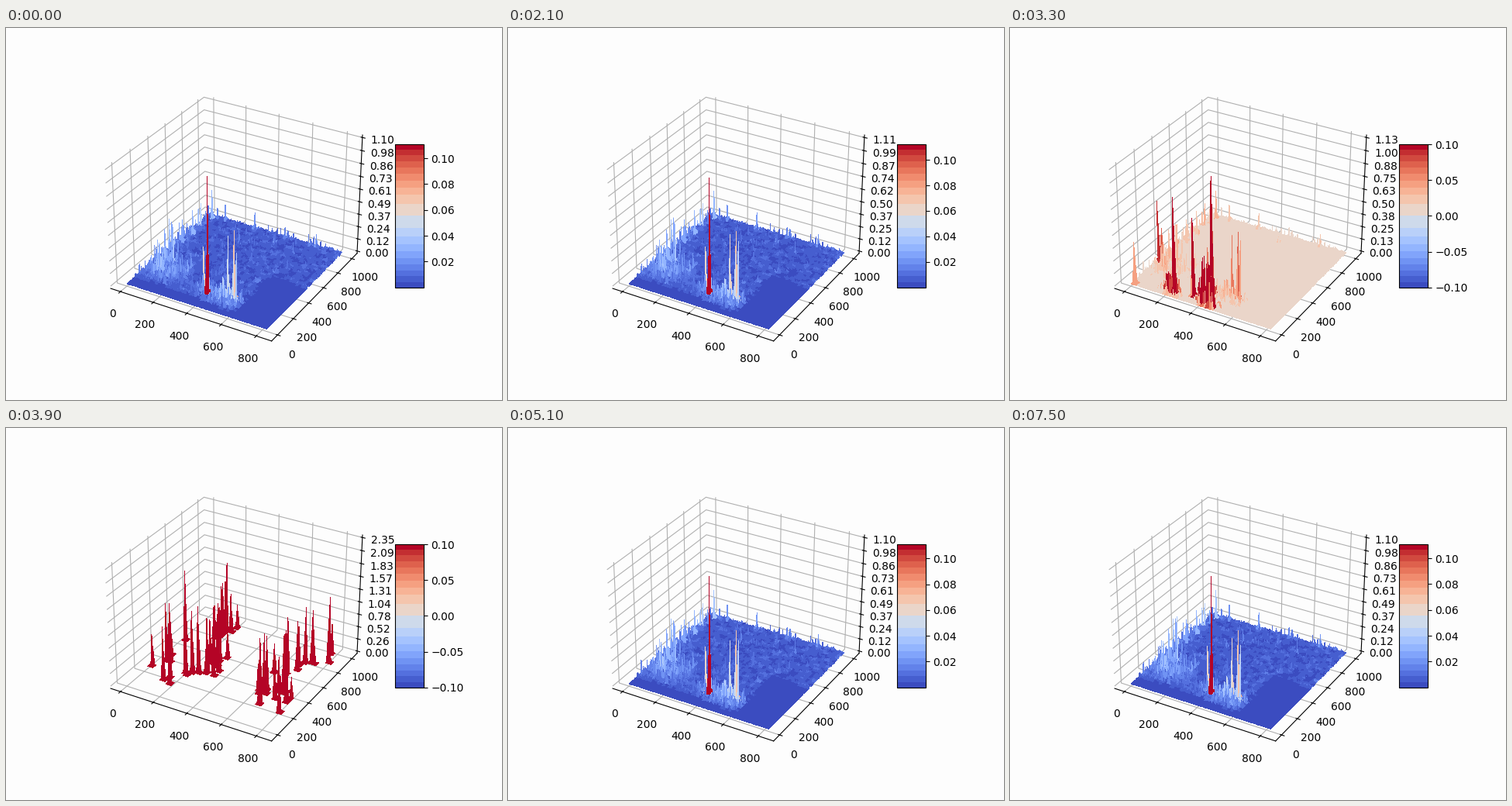
A matplotlib script that plays this animation: 640x480 px, repeating every 7.8 s.

```python
import numpy as np
import matplotlib.pyplot as plt
from matplotlib import cm
from matplotlib.animation import FuncAnimation
from matplotlib.colors import ListedColormap, Normalize
from matplotlib.ticker import FixedLocator, FormatStrFormatter

W, H = 640, 480
BG = "#fdfdfd"
XMAX, YMAX = 826, 1004
ROWS, COLS = 50, 52          # facets
RS, CS = 5, 4                # samples per facet
STEP_MS, STEPS = 300, 26
PEAK_STEP = 13

A, B = np.meshgrid(np.linspace(0, 1, COLS * CS + 1),
                   np.linspace(0, 1, ROWS * RS + 1))

# lone needles: a and b across the floor (0 to 1), height as part of the z axis
NEEDLES = [(0.494, 0.16, 1.0), (0.486, 0.16, 0.28), (0.5, 0.16, 0.25),
           (0.464, 0.16, 0.4), (0.66, 0.2, 0.58)]
BURSTS = [(0.02, 0.02, 0.36), (0.0, 0.33, 0.53), (0.03, 0.33, 0.3),
          (0.3, 0.04, 0.83), (0.41, 0.08, 0.67), (0.494, 0.16, 1.0)]
# groups of tall peaks: centre and number
GROUPS = [(0.35, 0.42, 11), (0.2, 0.85, 7), (0.78, 0.35, 9), (0.93, 0.33, 7),
          (0.85, 0.68, 6), (0.23, 0.2, 5), (0.04, 0.4, 4), (0.95, 0.88, 3)]


def z_top(step):
    return np.interp(step, [1, 7, 11, PEAK_STEP, 15, 17, 22, 25],
                     [1.101, 1.114, 1.128, 2.35, 1.128, 1.102, 1.109, 1.1005])


def is_burst(step):
    return abs(step - PEAK_STEP) <= 2


def banded_map(bands=10, power=0.76):
    """Coolwarm in flat bands that widen towards the middle."""
    t = np.linspace(-1, 1, 512)
    u = np.minimum(np.floor(abs(t) ** (1 / power) * bands), bands - 1) + 0.5
    u = np.sign(t) * (u / (bands - 0.5)) ** power
    return ListedColormap(cm.coolwarm(0.5 + u / 2))


def add_needle(z, a, b, height, reach=1):
    row = int(round(np.clip(b, 0, 1) * ROWS)) * RS
    col = round(np.clip(a, 0, 1) * COLS * CS)
    dist = abs(np.arange(z.shape[1]) - col) / (reach + 1)
    z[row] = np.maximum(z[row], height * np.clip(1 - dist, 0, 1) ** 1.5)


def add_groups(z, top):
    rng = np.random.default_rng(21)
    for a, b, count in GROUPS:
        for _ in range(count):
            pa, pb = rng.normal(a, 0.04), rng.normal(b, 0.07)
            height = top * rng.uniform(0.18, 0.6)
            add_needle(z, pa, pb, height, reach=2)
            add_needle(z, pa + 0.01, pb, 0.45 * height)
            add_needle(z, pa, pb, 0.08 * height, reach=4)
    add_needle(z, 0.04, 0.63, 0.62 * top, reach=2)
    add_needle(z, 0.21, 0.88, 0.61 * top)


def add_curtain(z, top):
    """Jagged wall along the front edge."""
    a = A[0]
    wall = (0.36 * np.exp(-((a - 0.28) / 0.06) ** 2)
            + 0.5 * np.exp(-((a - 0.54) / 0.06) ** 2))
    wall = wall * top * np.random.default_rng(8).random(a.size) ** 1.5
    z[RS:2 * RS + 1] = np.maximum(z[RS:2 * RS + 1], wall)


def hill(a, b, wa, wb):
    return np.exp(-((A - a) / wa) ** 2 - ((B - b) / wb) ** 2)


def quiet_floor(step):
    fixed, moving = np.random.default_rng(3), np.random.default_rng(100 + step)
    cells = 0.8 * fixed.random((ROWS, COLS)) + 0.2 * moving.random((ROWS, COLS))
    patch = np.pad(np.kron(cells ** 3, np.ones((RS, CS))), ((0, 1), (0, 1)), "edge")
    grain = fixed.exponential(1, A.shape) ** 2 / 2
    grain *= moving.uniform(0.85, 1.15, A.shape)
    rough = (0.003 + 0.017 * hill(0.14, 0.25, 0.13, 0.14)
             + 0.026 * hill(0.62, 0.15, 0.19, 0.06)
             + 0.008 * hill(0, 0.6, 0.06, 0.4) + 0.003 * hill(0.5, 1, 0.6, 0.04))
    z = 0.015 * patch + rough * grain
    still = ((A > 0.74) & (B < 0.52)) | ((A < 0.5) & (B < 0.09)) | (B < 0.06)
    z[still] *= 0.12

    for b in np.linspace(0.35, 0.95, 6):
        add_needle(z, fixed.uniform(0, 0.06), b, fixed.uniform(0.2, 0.32))
    for a in np.linspace(0.14, 0.82, 4):
        add_needle(z, a, 0.98, fixed.uniform(0.1, 0.17))
    for a, b, height in NEEDLES:
        add_needle(z, a, b, 1.1 * height)
    return z


def surface_data(step):
    top = z_top(step)
    if step == PEAK_STEP:
        z = np.zeros_like(A)
        add_groups(z, top)
        return z
    z = quiet_floor(max(step, 1))
    if is_burst(step):
        for a, b, height in BURSTS:
            add_needle(z, a, b, top * height, reach=3)
        add_curtain(z, top)
        if abs(step - PEAK_STEP) == 1:
            add_groups(z, 0.6 * top)
    return z


def padded(lo, hi, margin):
    d = (hi - lo) * margin
    return lo - d, hi + d


fig = plt.figure(figsize=(W / 100, H / 100), dpi=100, facecolor=BG)
ax = fig.add_axes([107.2 / W, 0.11, 369.6 / W, 0.77], projection="3d")
ax.set_facecolor("none")
cax = fig.add_axes([0.78375, 0.3025, 0.05775, 0.385])
for axis in (ax.xaxis, ax.yaxis, ax.zaxis):
    axis.set_pane_color((1, 1, 1, 0))
    axis.pane.set_edgecolor("#f0f0f0")
ax.xaxis.set_major_locator(FixedLocator(range(0, 801, 200)))
ax.yaxis.set_major_locator(FixedLocator(range(0, 1001, 200)))
ax.zaxis.set_major_formatter(FormatStrFormatter("%.02f"))

BANDS = banded_map()
PEAK_MAP = ListedColormap([(0, 0, 0, 0), "#b40426"])   # clear floor, red peaks
surf = None


def draw(step):
    global surf
    if surf is not None:
        surf.remove()
    top, burst, peak = z_top(step), is_burst(step), step == PEAK_STEP
    norm = Normalize(-0.1, 0.1) if burst else Normalize(0, 0.1007 * top)
    surf = ax.plot_surface(A * XMAX, B * YMAX, surface_data(step),
                           rstride=RS, cstride=CS, linewidth=0, antialiased=False,
                           cmap=PEAK_MAP if peak else BANDS,
                           norm=Normalize(0, 0.04) if peak else norm)
    for setter, hi, margin in ((ax.set_xlim, XMAX, 0.05), (ax.set_ylim, YMAX, 0.05),
                               (ax.set_zlim, top, 0)):
        setter(*padded(*padded(0, hi, margin), 1 / 48))
    ax.zaxis.set_major_locator(FixedLocator(np.linspace(0, top, 10)))

    cax.clear()
    ticks = np.linspace(-0.1, 0.1, 5) if burst else np.arange(1, 6) * 0.02
    fig.colorbar(cm.ScalarMappable(norm, BANDS), cax=cax, ticks=ticks)
    return []


anim = FuncAnimation(fig, draw, frames=STEPS, init_func=lambda: [],
                     interval=STEP_MS, repeat=True, repeat_delay=0)
plt.show()
```
